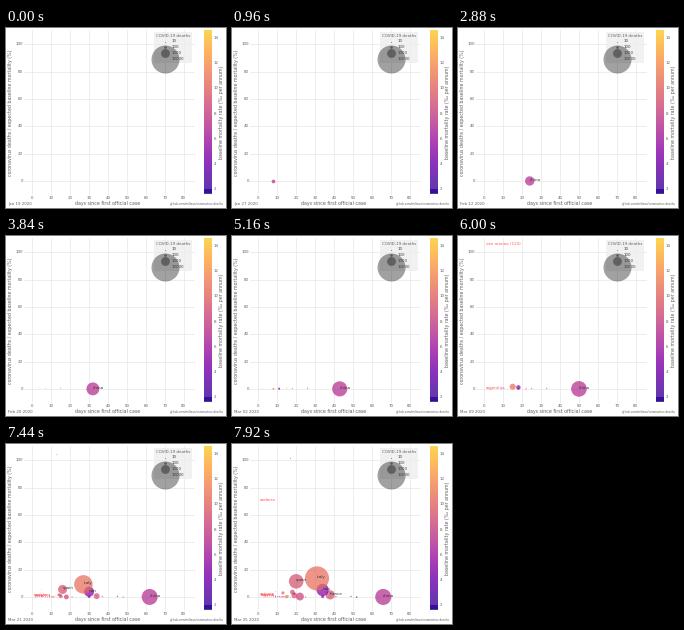
Write a matplotlib script that moves like this. It is 220 px wide and 180 px high and loops after 8000 ms.

```python
import random

import matplotlib.pyplot as plt
import numpy as np
from matplotlib.animation import FuncAnimation
from matplotlib.colors import LinearSegmentedColormap, Normalize
from matplotlib.patches import FancyBboxPatch, Rectangle

W, H, DPI = 220, 180, 100
PT = 72 / DPI                      # points per pixel
STEP, LOOP, DAY = 40, 8000, 120    # ms
LAST = 66
INK, RED, GRID = "#606060", "#ff3b3b", "#e6e6e6"

plt.rcParams["font.family"] = "DejaVu Sans"
cmap = LinearSegmentedColormap.from_list(
    "warm", plt.get_cmap("plasma")(np.linspace(0.06, 0.89, 128)))
norm = Normalize(1.6, 14.64)

# name, day of first death, population (M), yearly deaths per 1000,
# deaths on the last day, growth power
MAJOR = [
    ("china", 0, 1395, 7.1, 3287, 1),
    ("philippines", 14, 107, 5.9, 35, 9),
    ("france", 28, 67, 9.2, 1100, 8),
    ("iran", 32, 82, 4.8, 1934, 3.2),
    ("south korea", 32, 51.6, 5.7, 125, 2),
    ("italy", 35, 60.4, 10.5, 7400, 3.8),
    ("united states", 44, 327, 8.3, 801, 5),
    ("spain", 46, 46.7, 9.1, 2696, 4.2),
    ("united kingdom", 47, 66, 9.3, 422, 3.7),
    ("netherlands", 48, 17, 8.8, 276, 4),
    ("switzerland", 47, 8.5, 7.9, 86, 3),
    ("germany", 51, 83, 11.3, 149, 4),
    ("belgium", 53, 11.4, 9.6, 122, 3),
    ("san marino", 49, 0.0338, 8.78, 14, 0.8),
    ("argentina", 49, 44, 7.6, 6, 1),
    ("bahrain", 57, 1.64, 2.4, 4, 0.6),
    ("cayman islands", 57, 0.065, 5.56, 1, 1),
    ("andorra", 65, 0.077, 6.77, 1, 1),
]
MINOR = {
    17: "hong kong", 25: "japan", 28: "taiwan", 41: "australia,thailand",
    46: "iraq", 50: "egypt", 51: "canada,lebanon", 52: "morocco,panama",
    53: "greece,ireland,poland,indonesia,sweden",
    54: "algeria,norway,bulgaria,india",
    55: "ecuador,austria,azerbaijan,ukraine",
    56: "denmark,slovenia,sudan",
    57: "guatemala,hungary,portugal,luxembourg,romania,albania,turkey",
    58: "brazil,malaysia,dominican republic", 59: "croatia,moldova,cuba",
    60: "costa rica,pakistan,russia", 61: "peru,tunisia,mexico",
    62: "israel,finland,lithuania", 63: "serbia,chile,colombia",
    64: "cyprus,ghana,czechia", 65: "estonia,bosnia,nigeria",
}
CHINA = ([0, 3, 15, 24, 32, 43, 50, 58, 66],
         [3, 17, 400, 1114, 2122, 2915, 3123, 3231, 3287])

rng = random.Random(4)
countries = list(MAJOR)
for first, names in MINOR.items():
    for name in names.split(","):
        countries.append((name, first, 10 ** rng.uniform(0.4, 1.5),
                          rng.uniform(5, 13), (LAST - first) ** 0.8, 0.8))


def X(days):
    return 26.3 + 1.893 * days


def Y(percent):
    return 153.2 - 1.37 * percent


def area(deaths):
    radius = 14 * np.sqrt(np.asarray(deaths) / 10000)
    return (2 * radius * PT) ** 2


fig = plt.figure(figsize=(W / DPI, H / DPI), dpi=DPI, facecolor="white")
ax = fig.add_axes([0, 0, 1, 1])
ax.axis("off")


def label(x, y, s, size=4, color=INK, ha="left", va="center", **kw):
    return ax.text(x, y, s, fontsize=size * PT, color=color,
                   ha=ha, va=va, **kw)


for d in range(0, 90, 10):
    ax.plot([X(d)] * 2, [2, 166], color=GRID, lw=0.5, zorder=0)
    label(X(d), 170, str(d), ha="center")
for p in range(0, 101, 20):
    ax.plot([18, 188], [Y(p)] * 2, color=GRID, lw=0.5, zorder=0)
    label(17, Y(p), str(p), ha="right")

ax.imshow(np.linspace(1, 0, 164)[:, None], cmap=cmap, alpha=0.8,
          extent=(198, 206, 166, 2), aspect="auto")
ax.add_patch(Rectangle((198, 161), 8, 4, fc=cmap(0.0), ec="none", alpha=0.8))
for rate in range(2, 15, 2):
    label(207.5, 166 - 164 * norm(rate), str(rate))

label(102, 175, "days since first official case", 4.75, ha="center")
label(5, 85, "coronavirus deaths / expected baseline mortality (%)", 4.75,
      ha="center", rotation=90)
label(215.5, 84, "baseline mortality rate (‰ per annum)", 4.75,
      ha="center", rotation=90)
label(217.5, 176.5, "github.com/miltavo/coronavirus-deaths", 2.7, ha="right")
date = label(2, 176, "")

ax.add_patch(FancyBboxPatch((149, 5), 36, 29,
                            boxstyle="round,pad=1,rounding_size=1",
                            fc="#eeeeee", ec="none", alpha=0.8, zorder=1))
label(167, 8, "COVID-19 deaths", ha="center", zorder=4)
for n, y in zip((10, 100, 1000, 10000), (13.5, 19, 25, 31)):
    ax.scatter([158.7], [y], s=area(n), color="black", alpha=0.37,
               linewidths=0, zorder=3)
    label(166, y, str(n), color="#404040", zorder=4)

bubbles = ax.scatter([], [], s=[], linewidths=0, zorder=2)
ax.set_xlim(0, W)
ax.set_ylim(H, 0)
tags = []


def day_name(day):
    n = day + 19
    if n <= 31:
        return f"Jan {n:02d} 2020"
    if n <= 60:
        return f"Feb {n - 31:02d} 2020"
    return f"Mar {n - 60:02d} 2020"


def death_count(name, age, span, final, power):
    if name == "china":
        return np.interp(age, *CHINA)
    return max(1, round(final * (age / span) ** power))


def draw(frame):
    day = frame * STEP // DAY
    date.set_text(day_name(day))
    while tags:
        tags.pop().remove()
    points, sizes, rates = [], [], []
    for name, first, people, rate, final, power in countries:
        age = day - first
        if age < 1:
            continue
        deaths = death_count(name, age, LAST - first, final, power)
        expected = people * 1000 * rate / 365 * age
        percent = 100 * deaths / expected
        x, y = X(age), Y(min(percent, 105))
        if percent < 110:
            points.append((x, y))
            sizes.append(area(deaths))
            rates.append(rate)
        if age == 1 and name != "china":
            text = f"{name} ({percent:.0f})" if percent > 100 else name
            tags.append(label(x, y, text, color=RED, va="baseline",
                              alpha=0.85, zorder=5))
        elif deaths >= 1000:
            tags.append(label(x, y, name, color="#333333", va="baseline",
                              zorder=5))
    bubbles.set_offsets(np.array(points).reshape(-1, 2))
    bubbles.set_sizes(np.array(sizes))
    bubbles.set_facecolor(cmap(norm(np.array(rates)), alpha=0.72))
    return [bubbles, date, *tags]


anim = FuncAnimation(fig, draw, frames=LOOP // STEP, interval=STEP,
                     init_func=lambda: draw(0), repeat=True,
                     repeat_delay=0, blit=False)
plt.show()
```
